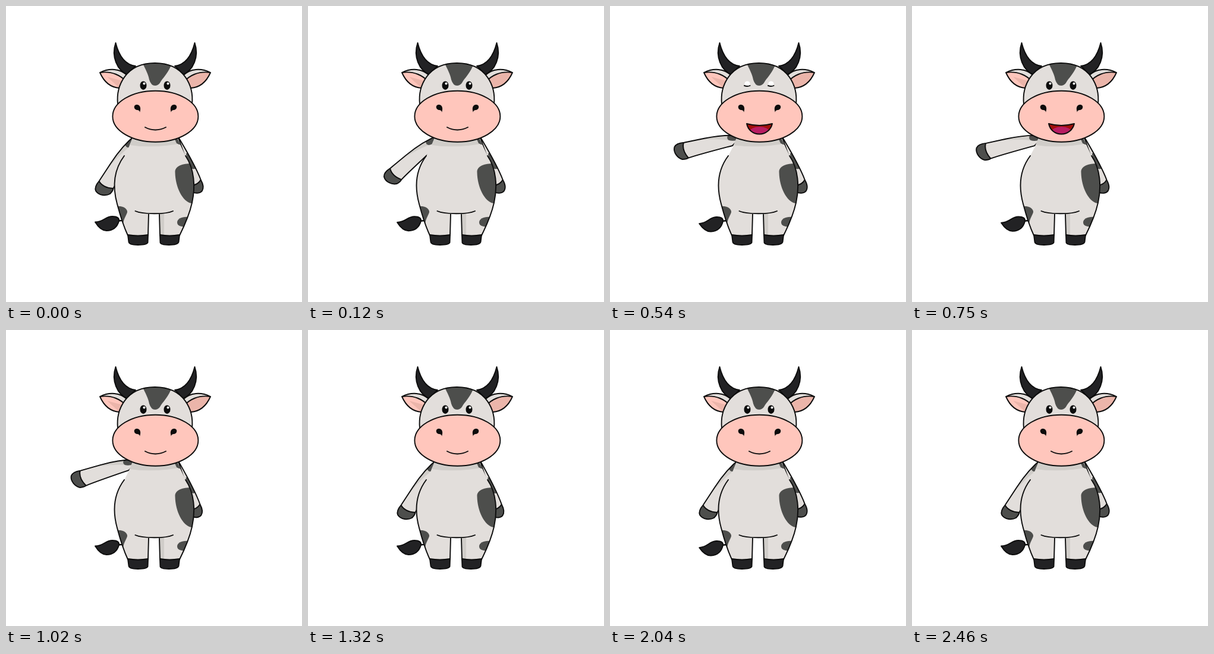
Animation, 498 px wide and 498 px high, one loop 2700 ms. Source, as an HTML page without scripts:

```html
<!DOCTYPE html>
<html lang="en">
<head>
<meta charset="utf-8">
<title>Waving cow</title>
<style>
  /* A registered angle keeps the turning parts crisp while they move. */
  @property --turn { syntax: "<angle>"; inherits: false; initial-value: 0deg; }

  html, body { margin: 0; width: 100%; height: 100%; overflow: hidden; background: #fff; }
  svg { display: block; width: 100%; height: 100%; }

  .line { fill: none; stroke: #0c0c0c; stroke-width: 1.9; stroke-linecap: round; stroke-linejoin: round; }
  .hide { fill: #e2dedb; }
  .shade { fill: #d0cdc9; }
  .patch { fill: #4d4e4c; }
  .dark { fill: #222224; }
  .pink { fill: #ffc6bc; }
  .ink { fill: #0c0c0c; }
  .left-ear { color: #ffc6bc; }
  .right-ear { color: #ebb5aa; }

  .wave, .sway, .wag { transform: rotate(var(--turn)); animation: 2.7s infinite ease-in-out; }
  .wave { transform-origin: 218px 223px; animation-name: wave; }
  .sway { transform-origin: 292px 226px; animation-name: sway; }
  .wag { transform-origin: 197px 361px; animation-name: wag; }
  .smile, .laugh, .open, .closed { animation: 2.7s infinite step-end; }
  .smile { animation-name: smile; }
  .laugh { animation-name: laugh; }
  .open { animation-name: open; }
  .closed { animation-name: closed; }

  @keyframes wave {
    0%, 48.9%, 100% { --turn: 0deg; }
    10% { --turn: 42deg; animation-timing-function: ease-out; }
    20% { --turn: 45.2deg; }
    23% { --turn: 45.5deg; }
    37.8% { --turn: 41deg; }
  }
  @keyframes sway {
    0%, 21%, 80%, 100% { --turn: 0deg; }
    48.9% { --turn: 1.7deg; }
  }
  @keyframes wag {
    0%, 39%, 65%, 91%, 100% { --turn: 0deg; }
    15%, 78% { --turn: -3.5deg; }
  }
  @keyframes smile { 0%, 33.3%, 100% { opacity: 1; } 5.5% { opacity: 0; } }
  @keyframes laugh { 0%, 33.3%, 100% { opacity: 0; } 5.5% { opacity: 1; } }
  @keyframes open { 0%, 23.3%, 100% { opacity: 1; } 17.7% { opacity: 0; } }
  @keyframes closed { 0%, 23.3%, 100% { opacity: 0; } 17.7% { opacity: 1; } }
</style>
</head>
<body>
<svg viewBox="0 0 498 498" role="img" aria-label="A cow lifts its arm and laughs">
  <defs>
    <path id="torso" d="M213 222Q207 238 199 252C181 276 179 304 187 333C192 352 197 369 205 386H239L240 349H258L259 386H292C301 368 309 349 313 331C319 304 317 274 302 252L288 222Z"/>
    <path id="skull" d="M188 165C185 136 200 96 250.500 96S316 136 313 165Z"/>
    <path id="arm" d="M218 217C204 228 189 245 176 265L157 294C151 301 149 306 151 311C156 319 168 320 175 316C178 313 180 310 180.500 307C189 290 203 266 218 240Z"/>
    <path id="arm-far" d="M289 219C302 241 318 267 328 293C332 300 333 306 330 311C327 315 320 316 314 313L300 250Z"/>
    <path id="mouth" d="M230 198Q251 204 273 198C271 208 262 215.500 251.500 215.500C240 215.500 232 208 230 198Z"/>
    <clipPath id="in-torso"><use href="#torso"/></clipPath>
    <clipPath id="in-skull"><use href="#skull"/></clipPath>
    <clipPath id="in-arm"><use href="#arm"/></clipPath>
    <clipPath id="in-arm-far"><use href="#arm-far"/></clipPath>
    <clipPath id="in-mouth"><use href="#mouth"/></clipPath>

    <g id="ear-and-horn">
      <path class="hide" d="M158 112C174 104 192 105 204 117L191 138C176 137 165 128 158 112Z"/>
      <path fill="currentColor" d="M158 112C178 109 194 117 203 128L191 138C176 137 165 128 158 112Z"/>
      <path fill="#ebb5aa" d="M170 119L203 128L191 138Z"/>
      <path class="line" d="M204 117C192 105 174 104 158 112C165 128 176 137 191 138M158 112C178 109 194 117 203 128"/>
      <path class="line" style="fill:#222224" d="M184.500 62C177 84 186 109 206 116Q210 107 218 101C201 99 190 84 184.500 62Z"/>
    </g>
    <path id="nostril" class="ink" d="M225 179C225 176 223 175 220 175C215 174 214 167 219 166C225 165 228 171 225 179Z"/>
    <g id="eye">
      <ellipse class="ink" cx="231" cy="133.700" rx="5.500" ry="7.200"/>
      <circle cx="232.500" cy="130.500" r="2" fill="#fff"/>
    </g>
    <g id="lid">
      <ellipse cx="231" cy="131" rx="4.600" ry="4.600" fill="#fff"/>
      <path class="line" d="M226 134Q231 136 235.500 134"/>
    </g>
  </defs>

  <rect width="498" height="498" fill="#fff"/>

  <g class="wag">
    <path class="line" style="stroke-width:2.500" d="M188 361Q194 362 198 360"/>
    <path class="line" style="fill:#222224" d="M150 363.500C165 363 167 354 179 354C187 354 191 357 190 362C187 372 180 378 169 378C160 378 154 370 150 363.500Z"/>
  </g>

  <g class="wave">
    <use href="#arm" class="hide"/>
    <g clip-path="url(#in-arm)">
      <path class="shade" d="M218 217C204 228 189 245 176 265L157 294Q180 258 212 234Z"/>
      <path class="patch" d="M200 231Q201 239 207 238Q213 235 218 227V215Z"/>
      <path class="line" style="fill:#4d4e4c" d="M156.500 294.500Q163 306 180.500 307L190 325H140V300Z"/>
    </g>
    <use href="#arm" class="line"/>
  </g>

  <g class="sway">
    <use href="#arm-far" class="hide"/>
    <g clip-path="url(#in-arm-far)">
      <path class="patch" d="M303 248Q304 263 309 272Q314 276 322 273L310 246Z"/>
      <path class="line" style="fill:#4d4e4c" d="M312 302Q323 301 328 292L338 300V320H312Z"/>
    </g>
    <use href="#arm-far" class="line"/>
  </g>

  <use href="#torso" class="hide"/>
  <g clip-path="url(#in-torso)">
    <path class="shade" d="M200 220V233Q250 241 300 230V220Z"/>
    <path class="shade" d="M257 349H266V387H257Z"/>
    <path class="patch" d="M283 222L287 231Q293 235 300 233V218Z"/>
    <path class="patch" d="M312 265C297 265 284 269 284.500 280C285 305 297 329 312 332L320 333V265Z"/>
    <path class="patch" d="M308 355C296 354 288 358 288 364C288 370 295 372 304 371Z"/>
    <path class="patch" d="M184 337C198 335 205 342 204 347C202 354 197 358 197 370L186 360Z"/>
  </g>
  <path class="line" d="M199 252C181 276 179 304 187 333C192 352 197 369 205 386M302 252C317 274 319 304 313 331C309 349 301 368 292 386M240 350L239 386M258 350L259 386M217.500 345C230 350.500 268 351 281 345"/>
  <path class="line" style="fill:#222224" d="M205 385Q222 388 239 385L238.500 398Q237 402 222 402Q207 402 206.500 397ZM259 385Q275 388 292 385L290.500 397Q289 402 274 402Q260 402 259.500 398Z"/>

  <use href="#ear-and-horn" class="left-ear"/>
  <use href="#ear-and-horn" class="right-ear" transform="translate(502) scale(-1 1)"/>
  <use href="#skull" class="hide"/>
  <path class="patch" clip-path="url(#in-skull)" d="M229 94C234 106 239 113 241 124Q244 134 251 134Q257 134 261 126C266 119 273 112 279 97Z"/>
  <use href="#skull" class="line"/>

  <g class="open"><use href="#eye"/><use href="#eye" x="40"/></g>
  <g class="closed"><use href="#lid"/><use href="#lid" x="40"/></g>

  <ellipse class="line" style="fill:#ffc6bc" cx="251.400" cy="185.700" rx="72" ry="43"/>
  <use href="#nostril"/>
  <use href="#nostril" transform="translate(503) scale(-1 1)"/>
  <path class="line smile" d="M234 204Q251 213 269 204"/>
  <g class="laugh">
    <use href="#mouth" fill="#a00f0a"/>
    <ellipse clip-path="url(#in-mouth)" cx="251.500" cy="212" rx="17" ry="9" fill="#b91d62"/>
    <use href="#mouth" class="line"/>
  </g>
</svg>
</body>
</html>
```
